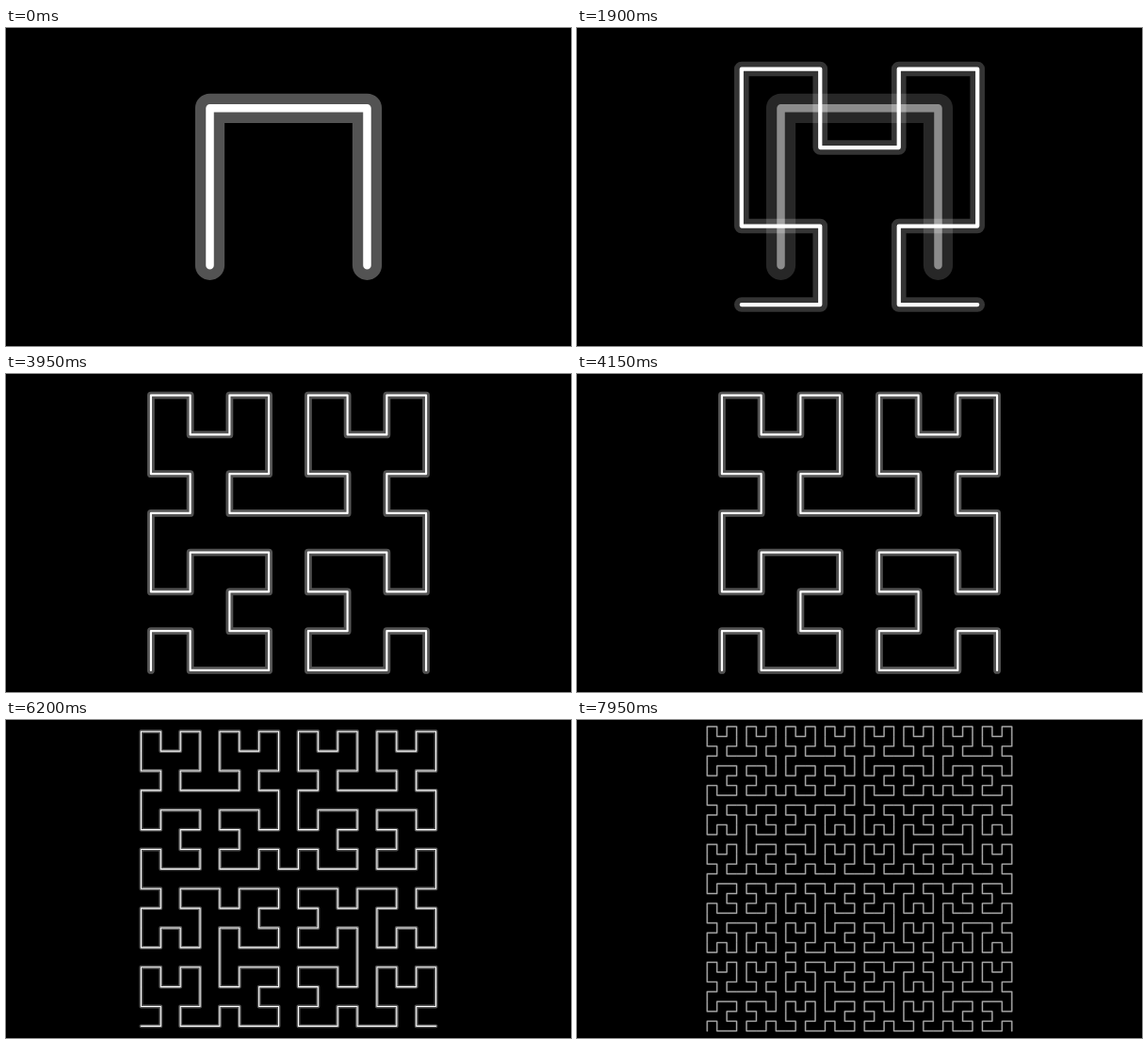
Animation, 600 px wide and 338 px high, one loop 8000 ms. Source, as an HTML page with a canvas:

```html
<!DOCTYPE html>
<html lang="en">
<head>
<meta charset="utf-8">
<title>Hilbert curve orders</title>
<style>
  html, body { margin: 0; width: 100%; height: 100%; overflow: hidden; background: #000; }
  canvas { display: block; }
</style>
</head>
<body>
<canvas id="stage" width="600" height="338"></canvas>
<script>
const ctx = document.getElementById('stage').getContext('2d');
const LOOP = 8000, SIDE = 334, CENTER_X = 300, CENTER_Y = 168.8;
const STARTS = [0, 1900, 3650, 6000, 7550]; // ms at which each order appears
const HALO = 0.325;

// Points in the unit square, y pointing up, from bottom left to bottom right.
function hilbert(order) {
  if (order === 0) return [[0.5, 0.5]];
  const half = hilbert(order - 1).map(([x, y]) => [x / 2, y / 2]);
  return [
    ...half.map(([x, y]) => [y, x]),
    ...half.map(([x, y]) => [x, y + 0.5]),
    ...half.map(([x, y]) => [x + 0.5, y + 0.5]),
    ...half.map(([x, y]) => [1 - y, 0.5 - x]),
  ];
}

const curves = STARTS.map((_, i) => {
  const path = new Path2D();
  for (const [x, y] of hilbert(i + 1)) {
    path.lineTo(CENTER_X + (x - 0.5) * SIDE, CENTER_Y - (y - 0.5) * SIDE);
  }
  return { path, step: SIDE / 2 ** (i + 1) };
});

function stroke({ path, step }, width, alpha) {
  ctx.lineWidth = step * width;
  ctx.strokeStyle = `rgba(255, 255, 255, ${alpha})`;
  ctx.stroke(path);
}

function drawCurve(curve, core, halo) {
  stroke(curve, 0.187, halo * HALO);
  stroke(curve, 0.051, core);
}

function draw(time) {
  const level = STARTS.findLastIndex(start => time >= start);
  const age = time - STARTS[level];
  const ghost = level > 0 ? Math.max(0, 0.47 * (1 - age / 100)) : 0;

  ctx.clearRect(0, 0, 600, 338);
  ctx.lineCap = ctx.lineJoin = 'round';
  if (ghost > 0) drawCurve(curves[level - 1], ghost, ghost);
  drawCurve(curves[level], 1, 1 - 0.8 * ghost);
}

function frame() {
  draw(performance.now() % LOOP);
  requestAnimationFrame(frame);
}
frame();
</script>
</body>
</html>
```
